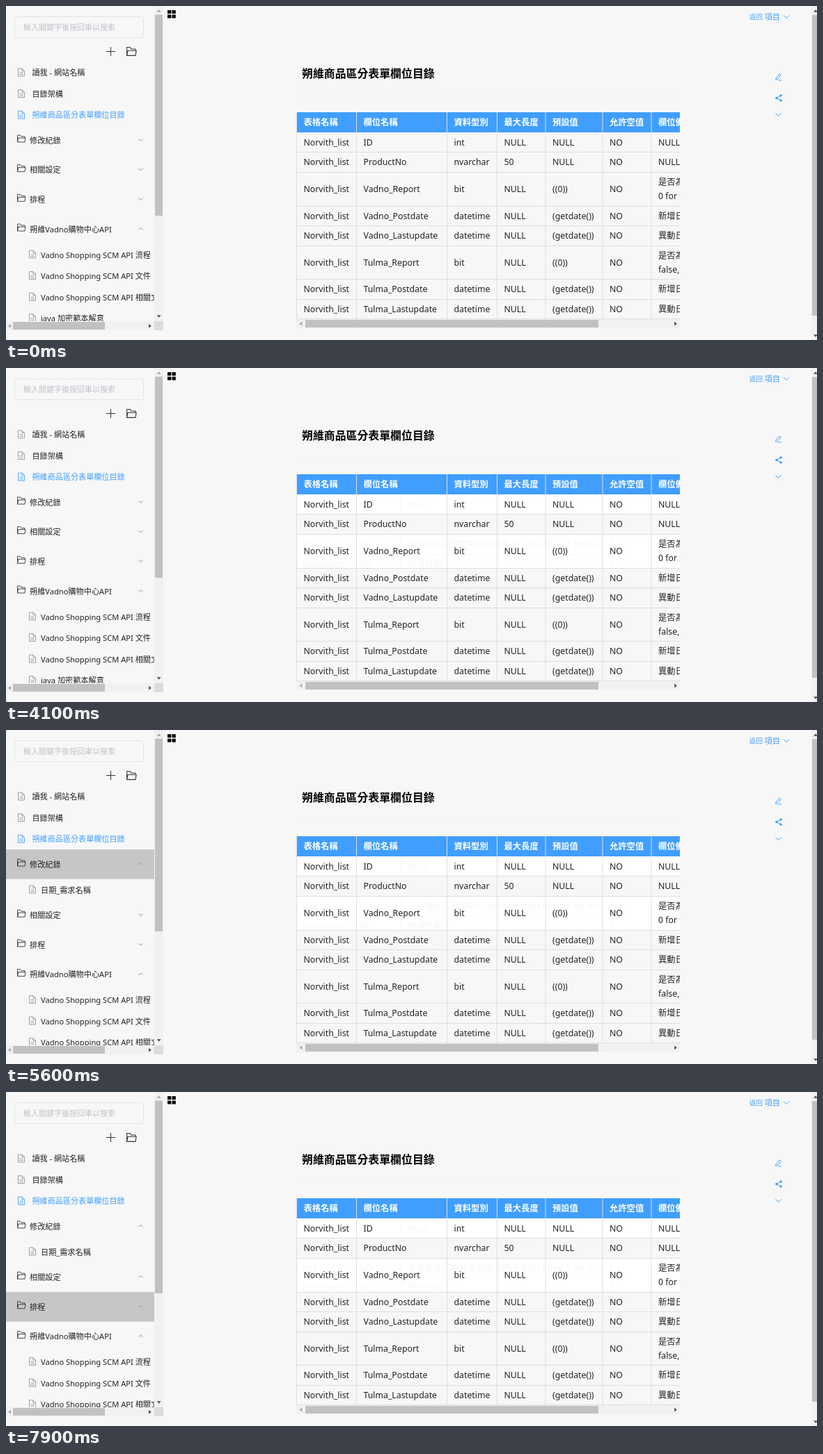
These frames come from a looping animation (1165 by 481 pixels, 8000 ms). An HTML page:

```html
<!DOCTYPE html>
<html lang="zh-Hant">
<head>
<meta charset="utf-8">
<style>
html, body { margin: 0; width: 100%; height: 100%; overflow: hidden; background: #f7f7f7; }
svg { display: block; }
text { font-family: "Noto Sans", "Noto Sans CJK TC", "Noto Sans CJK", sans-serif; white-space: pre; }
</style>
</head>
<body>
<svg id="stage" width="1165" height="481"></svg>
<script>
const BLUE = '#409eff', INK = '#222', PAGE = '#f7f7f7', TRACK = '#f1f1f1', THUMB = '#c1c1c1';
const TITLE = '朔維商品區分表單欄位目錄';
const HEAD = ['表格名稱', '欄位名稱', '資料型別', '最大長度', '預設值', '允許空值', '欄位備註'];
const FIELDS = [['ID', 'int'], ['ProductNo', 'nvarchar', '50'],
  ...['Vadno', 'Tulma'].flatMap(shop => [[shop + '_Report', 'bit', 'NULL', '((0))'],
    ...['_Postdate', '_Lastupdate'].map(s => [shop + s, 'datetime', 'NULL', '(getdate())'])])];
const NOTES = ['NULL', 'NULL', '是否為瓦諾購物中心提報商品 0 for false, 1 for true', '新增日期', '異動日期',
  '是否為Tulma提報商品 0 for false, 1 for true', '新增日期', '異動日期'];
const SPLIT = { 2: ['是否為瓦諾', '0 for false, 1'], 5: ['是否為Tulma', 'false, 1 for true'] };

const NARROW = { cols: [417.5, 503.5, 633.5, 705.5, 775, 857, 927, 1010],
  rows: [153, 182, 210.6, 239.2, 288, 316.5, 345, 393.5, 422, 450.5] };
const WIDE = { cols: [57.5, 143.5, 273.5, 345.5, 415.5, 497.5, 567.5, 869.5],
  rows: [153, ...Array.from({ length: 9 }, (_, i) => 182 + i * 28.67)] };

// Drawing helpers; text is placed by its vertical centre.
const rect = (x, y, w, h, fill, more = '') =>
  `<rect x="${x}" y="${y}" width="${w}" height="${h}" fill="${fill}" ${more}/>`;
const text = (x, y, s, size = 11.15, fill = INK, more = '') =>
  `<text x="${x}" y="${y + size * 0.37}" font-size="${size}" fill="${fill}" ${more}>${s}</text>`;
const line = (x, y, d, color, width = 1, more = '') =>
  `<path transform="translate(${x} ${y}) ${more}" d="${d}" fill="none" stroke="${color}" stroke-width="${width}"/>`;
const clip = (x, y, w, h, body) =>
  `<svg x="${x}" y="${y}" width="${w}" height="${h}" viewBox="${x} ${y} ${w} ${h}">${body}</svg>`;
const doc = (x, y, color = '#909399') =>
  line(x, y - 6, 'M.5 .5h5.5l3.5 3.5v7.5h-9zM6 .5v3.5h3.5M2.5 6.5h5M2.5 9h5', color, 0.9);
const folder = (x, y, k = 1) =>
  line(x, y, 'M.5 10.5v-10h4l1.5 2h5v2M.5 10.5l1.2-6h10.3l-1 6z', '#333', 0.9, `scale(${k})`);
const chevron = (x, y, color, turn = 0, size = 3.5) =>
  line(x, y, `M${-size} ${-size / 2}L0 ${size / 2}L${size} ${-size / 2}`, color, 1, `rotate(${180 * turn})`);
const arrow = (x, y, turn, color = '#505050') =>
  `<path transform="translate(${x} ${y}) rotate(${turn})" d="M-3 1.8L0 -1.8L3 1.8z" fill="${color}"/>`;
const squares = (x, color) =>
  [0, 6.5].map(dx => [0, 6.5].map(dy => rect(x + dx, 6 + dy, 5.3, 5, color)).join('')).join('');

function table({ cols, rows }, ink, edge, headFill, headInk, split) {
  const x0 = cols[0], width = cols[7] - x0, bottom = rows[9];
  let out = rect(x0 - 0.5, 153, width + 1, 29, headFill);
  HEAD.forEach((s, i) => out += text(cols[i] + 10, 167.5, s, 12.3, headInk, 'font-weight="700"'));
  out += cols.map(x => line(x, 153, `M0 0V${bottom - 153}`, edge)).join('');
  out += rows.slice(2).map(y => line(x0, Math.floor(y) + 0.5, `M0 0h${width}`, edge)).join('');
  FIELDS.forEach(([name, type, max = 'NULL', preset = 'NULL'], r) => {
    const y = (rows[r + 1] + rows[r + 2]) / 2;
    ['Norvith_list', name, type, max, preset, 'NO'].forEach((s, i) => out += text(cols[i] + 10, y, s, 12.3, ink));
    const lines = split && SPLIT[r] || [NOTES[r]];
    lines.forEach((s, i) => out += text(cols[6] + 10, y + (i - (lines.length - 1) / 2) * 19.5, s, 12.3, ink));
  });
  return out;
}

function toolbar(dx) {
  return `<g transform="translate(${dx})">` + text(1068, 15.5, '返回', 9.4, BLUE) +
    text(1089.5, 15.5, '項目', 11.2, BLUE) + chevron(1121, 15.5, BLUE, 0, 4) +
    line(1105, 97, 'M1 7L6 .8L8.2 2.5L3.5 8.6L.8 9.5zM4.5 10H9', BLUE) +
    line(1105, 127, 'M8 2L2 5.5L8 9', BLUE) +
    [[1113, 129], [1107, 132.5], [1113, 136]].map(([x, y]) => `<circle cx="${x}" cy="${y}" r="1.8" fill="${BLUE}"/>`).join('') +
    chevron(1109.5, 156.5, BLUE, 0, 4) + '</g>';
}

const heading = (x, color) => text(x, 97, TITLE, 15.9, color, 'font-weight="700"');

function sidebar(t) {
  const ramp = (start, steps) => Math.max(0, Math.min(1, (Math.floor((t - start) / 100) + 1) / steps));
  const open = ramp(5300, 4), drop = 30.6 * open * open * (3 - 2 * open);
  const glow = (y, h, k) => rect(0, y, 213, h, '#c6c6c6', `opacity="${k}"`);
  const group = (y, name, hover, turn) => glow(y, 42.7, hover) + folder(16, y + 13.5) +
    text(34, y + 21.5, name) + chevron(193.5, y + 20.8, '#909399', turn, 3);

  let out = rect(12.5, 15.5, 185, 30, PAGE, 'rx="3" stroke="#e2e4e8"') +
    text(25, 31, '輸入關鍵字後按回車以搜索', 11, '#c0c4cc') +
    line(150.5, 65.5, 'M-6.5 0H6.5M0 -6.5V6.5', '#333') + folder(173, 59, 1.18);
  ['讀我 - 網站名稱', '目錄架構', TITLE].forEach((s, i) => {
    const y = 95.5 + i * 30.6, on = i === 2;
    out += doc(17, y, on ? BLUE : undefined) + text(37.5, y + 0.5, s, 11.1, on ? BLUE : INK);
  });
  out += group(172, '修改紀錄',
    0.3 * (ramp(4500, 1) - ramp(4700, 1)) + ramp(4900, 2) - ramp(6000, 2), open);
  if (drop) out += clip(0, 214.6, 213, drop,
    glow(214.6, 30.6, ramp(6000, 2) - ramp(6500, 1)) + doc(33, 229.5) + text(50, 230.5, '日期_需求名稱'));
  out += `<g transform="translate(0 ${drop})">` +
    group(214.6, '相關設定', ramp(4500, 3) - ramp(4900, 2) + ramp(6500, 1) - ramp(7100, 2), ramp(6700, 4)) +
    group(257.3, '排程', ramp(7100, 2), ramp(7700, 3)) +
    group(300, '朔維Vadno購物中心API', 0, 1) +
    ['Vadno Shopping SCM API 流程', 'Vadno Shopping SCM API 文件', 'Vadno Shopping SCM API 相關文件', 'java 加密範本解意']
      .map((s, i) => doc(33, 357.5 + i * 30.6) + text(50, 358.5 + i * 30.6, s)).join('') + '</g>';

  return clip(0, 0, 213, 454, out) +
    rect(213, 0, 13, 454, TRACK) + rect(214, 12.5, 11, 289.5 - 12 * open, THUMB) +
    arrow(219.7, 7, 0, '#a3a3a3') + arrow(219.7, 447, 180) +
    rect(0, 454, 213, 13, TRACK) + rect(10, 455, 132, 11, THUMB) +
    arrow(5, 460.7, -90, '#a3a3a3') + arrow(207, 460.7, 90) + rect(213, 454, 13, 13, '#dcdcdc');
}

function tooltip(t) {
  const k = [0.35, 0.7, 0.35][Math.floor(t / 100) - 4];
  return k ? `<g opacity="${k}">` + rect(1042, 89, 52, 27, '#303133', 'rx="3.5"') +
    `<path d="M1094 97.5l5 5l-5 5z" fill="#303133"/>` + text(1052, 102.5, '編輯頁', 10.6, '#fff') + '</g>' : '';
}

function splitView(t) {
  const bands = [[182, 28.6], [239.5, 48.5]];
  let out = rect(0, 0, 1165, 481, PAGE) + sidebar(t) + squares(232, '#000') + heading(425, '#000') +
    line(425, 129.5, 'M0 0H535', '#f2f2f2');
  // Traces of the full-width view stay visible after it closes.
  if (t >= 4100) out += bands.map(([y, h]) => clip(417, y, 551, h,
    rect(417, y, 551, h, '#fff') + table(WIDE, '#f6f6f6', '#f8f8f8', '#fff', '#fff'))).join('');
  out += clip(417, 153, 551, 298, table(NARROW, INK, '#dedede', BLUE, '#fff', true)) +
    rect(417, 451, 551, 13, TRACK) + rect(430, 452, 421, 11, THUMB) +
    arrow(423.5, 457.5, -90, '#a3a3a3') + arrow(962, 457.5, 90) +
    rect(1157, 0, 8, 481, TRACK) + rect(1158, 13, 7, 433, THUMB) +
    arrow(1163, 7, 0) + arrow(1163, 475, 180);
  return out + toolbar(0) + tooltip(t);
}

function fullView() {
  const page = '#f9f9f9', stripe = (r, color) => rect(57.5, WIDE.rows[r], 812, 28.67, color);
  let out = rect(0, 0, 1165, 481, page) + rect(0, 0, 226, 467, '#fff') + rect(1157, 0, 8, 481, '#fff') +
    rect(13, 16, 184, 29, page, 'rx="3"') + text(25, 31, '輸入關鍵字後按回車以搜索', 11, '#fff');
  out += [2, 4, 6, 8].map(r => stripe(r, '#f8f8f8')).join('');
  out += rect(417, 182, 551, 28.6, '#fff') + rect(417, 239.5, 551, 48.5, '#fff') + rect(417, 451, 551, 13, '#fff') +
    clip(417, 153, 551, 298, table(NARROW, '#fff', '#fcfcfc', '#fff', '#f3f3f3', true));
  out += stripe(1, '#fff') + stripe(3, '#fff') + squares(232, '#fff') + heading(425, '#fff');
  return out + squares(3, '#000') + heading(65, '#000') + line(65, 129.5, 'M0 0H1038', '#eee') +
    table(WIDE, INK, '#dedede', BLUE, '#fff') + toolbar(13);
}

const stage = document.getElementById('stage');
let shown = -1;
function frame() {
  const t = Math.floor(performance.now() % 8000 / 100) * 100;
  if (t !== shown) {
    shown = t;
    stage.innerHTML = t >= 2400 && t < 4100 ? fullView() : splitView(t);
  }
  requestAnimationFrame(frame);
}
frame();
</script>
</body>
</html>
```
